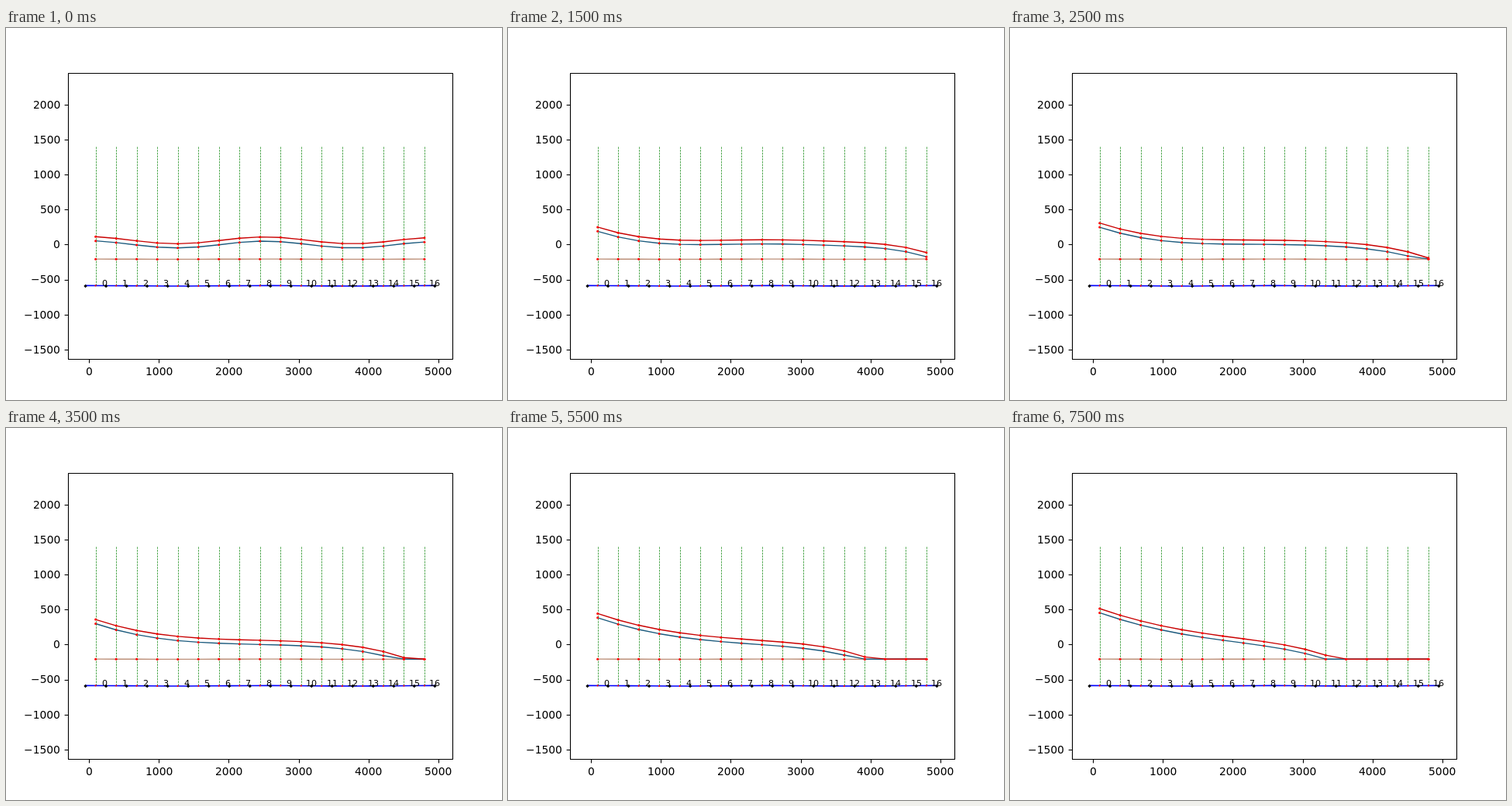
Recreate the animation shown at these times as an HTML page with a canvas. Size 640 by 480 pixels, loop 8000 ms.

```html
<!DOCTYPE html>
<html>
<head>
<meta charset="utf-8">
<style>
html, body { margin: 0; width: 640px; height: 480px; overflow: hidden; background: #fff; }
canvas { display: block; }
</style>
</head>
<body>
<canvas id="c" width="640" height="480"></canvas>
<script>
const ctx = document.getElementById('c').getContext('2d');
const COLS = 17, WIDTH = 294, STEP = 500, STEPS = 16;
const FLOOR = -208, LAYER = 60, DIFF = 1.12, FLOW = 122.5, DT = 0.02;
const SCALE = 0.0902;
const px = v => 107.06 + v * SCALE;
const py = v => 279.4 - v * 0.0903;
const snap = v => Math.round(v) + 0.5;
const range = (n, start) => Array.from({ length: n }, (_, i) => start + WIDTH * i);
const nodes = range(COLS, 95), edges = range(COLS + 1, -50);
const ripple = (xs, base, amp) => xs.map(x => base + amp * Math.cos(x / 400));
const floorLine = ripple(nodes, FLOOR - 1, 1.5);

// Diffusion with inflow on the left and erosion from the right down to the floor
function advance(h, time) {
  for (let n = Math.round(time / DT); n > 0; n--) {
    const old = h.slice();
    for (let i = 0; i < COLS - 1; i++) {
      const flux = DIFF * (old[i] - old[i + 1]) * DT;
      h[i] -= flux;
      h[i + 1] += flux;
    }
    h[0] += FLOW * DT;
    // A thin layer at the outlet erodes a little faster
    let demand = FLOW * DT * (old[COLS - 1] < FLOOR + LAYER ? 1.09 : 1);
    for (let i = COLS - 1; i >= 0 && demand > 0; i--) {
      const cut = Math.min(demand, Math.max(0, h[i] - FLOOR));
      h[i] -= cut;
      demand -= cut;
    }
  }
  return h;
}

const states = [advance(ripple(nodes, 60, 50), 0.04)];
while (states.length < STEPS) states.push(advance(states[states.length - 1].slice(), 1));

function line(x1, y1, x2, y2) {
  ctx.beginPath();
  ctx.moveTo(x1, y1);
  ctx.lineTo(x2, y2);
  ctx.stroke();
}

// align: 0.5 centres the text on x, 1 ends it there
function label(text, x, y, align) {
  ctx.fillText(text, Math.round(x - ctx.measureText(text).width * align), y);
}

function curve(xs, ys, color, width) {
  ctx.strokeStyle = color;
  ctx.lineWidth = width;
  ctx.lineJoin = 'round';
  ctx.beginPath();
  ys.forEach((y, i) => ctx.lineTo(px(xs[i]), py(y)));
  ctx.stroke();
}

function dots(ys, r) {
  ctx.fillStyle = '#f00';
  ys.forEach((y, i) => {
    ctx.beginPath();
    ctx.arc(px(nodes[i]), py(y), r, 0, 7);
    ctx.fill();
  });
}

function drawAxes() {
  ctx.strokeStyle = ctx.fillStyle = '#000';
  ctx.lineWidth = 1.11;
  ctx.strokeRect(80.5, 58.5, 496, 369);
  ctx.font = '13.89px "DejaVu Sans", sans-serif';
  for (let v = 0; v <= 5000; v += 1000) {
    const x = snap(px(v));
    line(x, 427.5, x, 432.4);
    label(String(v), px(v), 448, 0.5);
  }
  for (let v = -1500; v <= 2000; v += 500) {
    const y = snap(py(v));
    line(75.6, y, 80.5, y);
    label(String(v).replace('-', '\u2212'), 70.3, Math.round(py(v) + 4.9), 1);
  }
}

function drawGuides() {
  ctx.strokeStyle = '#008000';
  ctx.lineWidth = 0.69;
  ctx.setLineDash([2.57, 1.11]);
  for (const v of nodes) line(snap(px(v)), py(-590), snap(px(v)), py(1400));
  ctx.setLineDash([]);
}

function drawEdges() {
  ctx.fillStyle = '#000';
  ctx.font = '11.11px "DejaVu Sans", sans-serif';
  edges.forEach((v, i) => {
    const x = px(v), y = 333, r = 2.2;
    ctx.beginPath();
    ctx.moveTo(x - r, y);
    ctx.lineTo(x, y - r);
    ctx.lineTo(x + r, y);
    ctx.lineTo(x, y + r);
    ctx.fill();
    if (i) label(String(i - 1).padEnd(2), x, 333, 0.5);
  });
}

function draw(now) {
  const top = states[Math.floor(now / STEP) % STEPS];
  const lower = top.map(h => Math.max(FLOOR, h - LAYER));
  ctx.fillStyle = '#fff';
  ctx.fillRect(0, 0, 640, 480);
  drawGuides();
  curve(nodes, floorLine, '#bc8f78', 1.39);
  curve(edges, ripple(edges, -590, 3), '#00f', 1.6);
  curve(nodes, lower, '#1b5a7d', 1.39);
  curve(nodes, top, '#c80000', 1.39);
  dots(ripple(nodes, -590, 3), 1.1);
  for (const ys of [floorLine, lower, top]) dots(ys, 1.5);
  drawEdges();
  drawAxes();
  requestAnimationFrame(draw);
}
requestAnimationFrame(draw);
</script>
</body>
</html>
```
